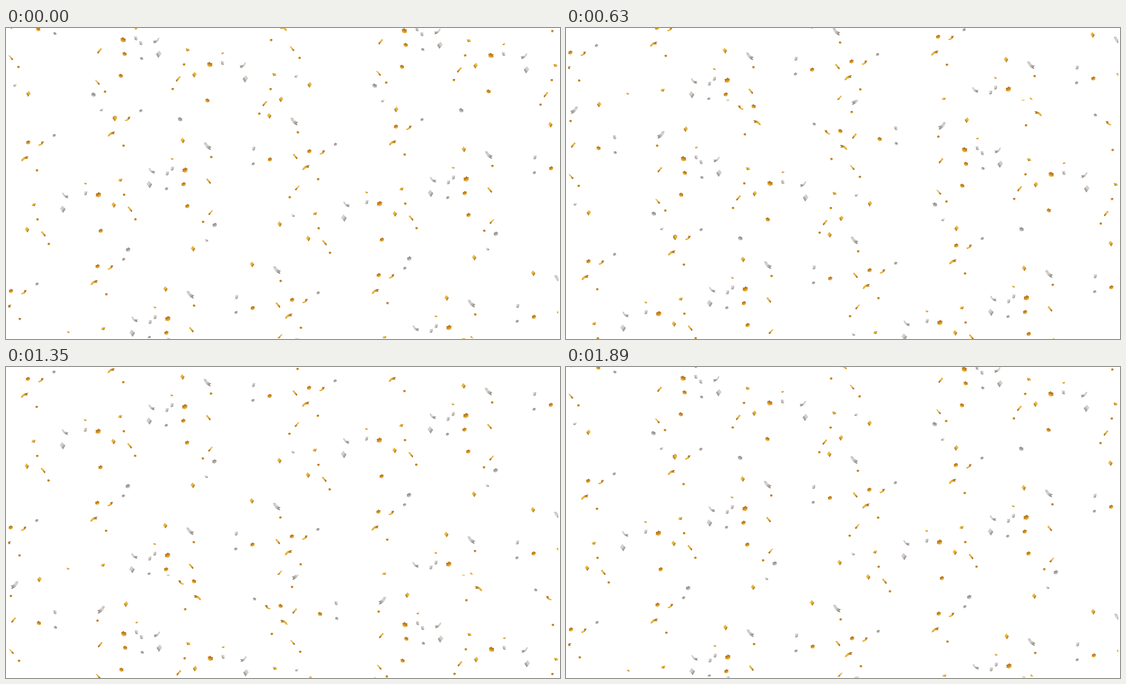
Write an HTML page that moves like this. It is 998 by 561 pixels and loops after 1.98 s.

```html
<!DOCTYPE html>
<html lang="en">
<head>
<meta charset="utf-8">
<title>Falling confetti</title>
<style>
  html, body { margin: 0; width: 100%; height: 100%; overflow: hidden; background: #fff; }
  svg { display: block; width: 100vw; height: 100vh; }
</style>
</head>
<body>
<svg viewBox="0 0 998 561">
  <defs>
    <linearGradient id="gold" x2="1" y2="1">
      <stop offset=".05" stop-color="#dd9f25"/><stop offset=".38" stop-color="#efc046"/><stop offset=".9" stop-color="#9c5c12"/>
    </linearGradient>
    <linearGradient id="goldSide" href="#gold" x1="0" y1=".8" x2="1" y2=".2"/>
    <linearGradient id="goldFall" href="#gold" x1="1" y1="0" x2="0" y2="1"/>
    <linearGradient id="goldCurl" x1=".75" y1="1" x2=".3" y2="0">
      <stop offset=".1" stop-color="#f0c244"/><stop offset=".5" stop-color="#c98420"/><stop offset="1" stop-color="#98590f"/>
    </linearGradient>
    <linearGradient id="silver" x2="1" y2="1">
      <stop offset=".1" stop-color="#c9c3be"/><stop offset=".4" stop-color="#d9d4d0"/><stop offset=".9" stop-color="#7d736d"/>
    </linearGradient>
    <linearGradient id="silverCurl" x1=".75" y1="1" x2=".3" y2="0">
      <stop offset=".1" stop-color="#d5d0cc"/><stop offset=".5" stop-color="#a69d98"/><stop offset="1" stop-color="#7f756f"/>
    </linearGradient>
    <clipPath id="stage"><rect x="4" width="991" height="561"/></clipPath>
    <clipPath id="sheetEdge"><rect x="-100" y="-85.1" width="1250" height="644.6"/></clipPath>
    <g id="cluster"></g>
    <g id="rising"><use href="#cluster"/><use href="#cluster" x="-31" y="268"/></g>
    <g id="mirrored"><use href="#cluster" transform="translate(533.5 -235) scale(-1 1)"/></g>
    <g id="sheet" clip-path="url(#sheetEdge)">
      <use href="#rising"/><use href="#rising" x="506.5" y="16"/>
      <use href="#mirrored"/><use href="#mirrored" x="506.5" y="-16.3"/>
    </g>
  </defs>
  <g clip-path="url(#stage)">
    <g id="fall">
      <use href="#sheet"/>
      <use href="#sheet" x="-1.6" y="-644.6"/>
      <use href="#sheet" x="1.6" y="644.6"/>
    </g>
  </g>
</svg>
<script>
const STEP_MS = 90, STEPS = 22, FALL = 30.65, DRIFT = 0.075;
const COPY = [-156, 44.5];

const curl = 'M-3.8-1.8L-1.8-2.2Q-.4-2.6.2-4.2Q1.2-2.6 3.8-2.4Q2.9 0 3.8 1.4Q2.4 1.8 1.2 3.4Q-1 3.8-2.4 2.6L-4 2.2Q-2.6.4-3.8-1.8Z';
const diamond = 'M-3.8-.6L-.6-5L3.8-.2L.6 5Z';

const kinds = {
  curl: [curl, 'goldCurl'],
  bigCurl: [curl, 'goldCurl', 1.25],
  silverCurl: [curl, 'silverCurl', 1.05],
  silverBit: [curl, 'silverCurl', 0.76],
  diamond: [diamond, 'gold', 1.04],
  bigDiamond: [diamond, 'silver', 1.32],
  leaf: ['M-3.2 2.8L-2-3L3-3.6L2 2.4L-1 4Z', 'silver'],
  flat: ['M-4 1.6L-1.6-2.4L4-2.6L1.8 2.6Z', 'gold'],
  silverFlat: ['M-3.2-2.4L1.6-1.8L3.2 1.4L-1.4 2.2Z', 'silver'],
  bit: ['M-2.4-1.4L.2-2.2L2.4-.8L1.4 2.2L-1.8 1.8Z', 'goldCurl'],
  tiny: ['M-2.6-1.6L.8-1.2L2.6.6L0 1.8L-2.2.8Z', 'gold'],
  strip: ['M-4.5-3.4L-1.9-5L4.2 2.6L3 5Q0 2.4-4.5-3.4Z', 'gold'],
  slant: ['M-4.6 3L1.6-3.6L4.6-4.4L-1.8 4.6Z', 'goldFall'],
  ribbon: ['M-6.8 5Q-5.5-3.8 6.8-4.2L4.2-1.8L5.8.6Q-.6 0-3 3.8Z', 'goldSide'],
  smile: ['M-5.2 2.8Q.6 1.8 1.2-4L2.8-2.4L5-4Q4.2 3.4-3 4.6Z', 'goldSide'],
  silverRibbon: ['M-6-5L-3.4-4.4Q-1.4.8 5.8.6L3.6 2.8L5.4 5Q-4.4 4.4-6-5Z', 'silver'],
  sash: ['M-7-6.6L-2.2-6.4Q.4-.2 7 1.6L4.2 3.6L6 7.2Q-4.8 4.4-7-6.6Z', 'silver']
};

// kind, x, y, direction of the second copy (0: none)
const pieces = [
  ['curl', 196, 162, 1], ['smile', 219, 163.5, 1], ['silverBit', 243, 149.5, 1],
  ['ribbon', 190, 191, 1], ['bit', 212, 212.5, 1],
  ['diamond', 318.3, 203, -1], ['sash', 363.3, 213, -1], ['bit', 370, 233, -1],
  ['tiny', 299.3, 236, 1], ['bigCurl', 322.5, 256.5, 1], ['leaf', 299.5, 253.5, 1],
  ['silverRibbon', 263, 257.5, 1], ['bigDiamond', 258.3, 282.3, 1],
  ['leaf', 290.5, 262.3, 0], ['curl', 320, 282, 0], ['silverBit', 289.3, 290.3, 0],
  ['strip', 365, 276.3, -1], ['curl', 326.7, 321.5, 1], ['silverCurl', 376, 355.5, 1],
  ['slant', 368.7, 333, -1], ['bit', 355.3, 350, -1], ['silverFlat', 361.3, 383, -1],
  ['diamond', 337, 398.3, -1], ['flat', 206, 274.3, 1], ['bit', 213, 301, 1],
  ['diamond', 194, 319.3, 1], ['strip', 223.3, 327, 1], ['bit', 233.3, 345.3, 1],
  ['leaf', 446.3, 217.3, 0], ['silverBit', 445.5, 245.3, 0], ['curl', 475.5, 237.3, 0]
];

function drawPiece(kind, x, y) {
  const [d, fill, scale = 1] = kinds[kind];
  return `<path d="${d}" fill="url(#${fill})" transform="translate(${x} ${y}) scale(${scale})"/>`;
}

document.getElementById('cluster').innerHTML = pieces.map(([kind, x, y, dir]) =>
  drawPiece(kind, x, y) + (dir ? drawPiece(kind, x + dir * COPY[0], y + dir * COPY[1]) : '')
).join('');

const fall = document.getElementById('fall');
const start = performance.now();

function render(now) {
  const step = Math.floor(Math.max(0, now - start) / STEP_MS) % STEPS;
  fall.setAttribute('transform', `translate(${step * DRIFT} ${step * FALL})`);
  requestAnimationFrame(render);
}
render(start);
</script>
</body>
</html>
```
